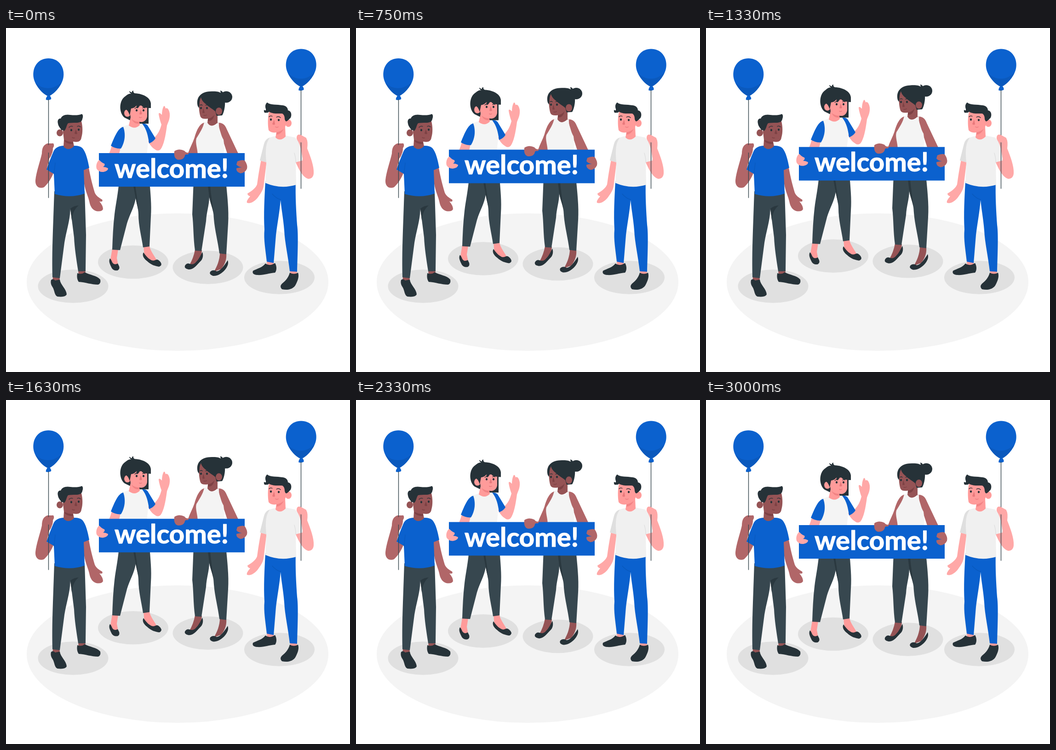
These frames come from a looping animation (748 px wide and 748 px high, 3.04 s). An HTML page with a canvas:

```html
<!DOCTYPE html>
<html lang="en">
<head>
<meta charset="utf-8">
<title>Welcome</title>
<style>
html, body { margin: 0; width: 100%; height: 100%; overflow: hidden; background: #fff; }
canvas { display: block; width: 748px; height: 748px; }
</style>
</head>
<body>
<canvas id="stage" width="748" height="748"></canvas>
<script>
const ctx = document.getElementById('stage').getContext('2d');

const BLUE = '#0b61ce', DEEP = '#0a59bd', INK = '#263238', SLATE = '#37474f', FOLD = '#2a383f';
const PINK = '#ffa8a7', ROSE = '#ff9b9a', BROWN = '#b16668', UMBER = '#955355', DUSK = '#7d4144';
const WHITE = '#f4f4f4', SHIRT = '#f0f0f0', SHADE = '#dfdfdf';

const LOOP = 3040, RATE = 24, HALF = 1500, RISE = 14.96;

function fill(color, d) {
  ctx.fillStyle = color;
  ctx.fill(new Path2D(d));
}

function line(color, width, d) {
  ctx.strokeStyle = color;
  ctx.lineWidth = width;
  ctx.lineCap = 'round';
  ctx.stroke(new Path2D(d));
}

function oval(color, x, y, rx, ry = rx) {
  ctx.fillStyle = color;
  ctx.beginPath();
  ctx.ellipse(x, y, rx, ry, 0, 0, 7);
  ctx.fill();
}

const shadow = (x, y) => oval('#e0e0e0', x, y, 76.5, 36.3);

function balloon(x, y) {
  ctx.save();
  ctx.translate(x, y);
  fill(BLUE, 'M0 0C20 0 33 15 33 35C33 56 15 74 5 80Q0 83 -5 80C-15 74 -33 56 -33 35C-33 15 -20 0 0 0Z');
  fill(DEEP, 'M-28 53C-12 70 14 68 29 51C24 64 13 75 5 80Q0 83 -5 80C-14 75 -23 64 -28 53Z');
  fill(BLUE, 'M-2 81L3 81Q7 86 5.500 89Q0 92 -5.500 90Q-6 86 -2 81Z');
  ctx.restore();
}

const string = (x, y, end) => line(SLATE, 1.4, `M${x} ${y}V${end}`);

function features(eyes, brows, nose, mouth, shade) {
  for (const [x, y] of eyes) oval(INK, x, y, 2.1, 2.5);
  line(INK, 1.3, brows);
  fill(shade, nose);
  line(shade, 1.5, mouth);
}

function manLeft() {
  shadow(146, 561.5);
  // feet
  fill(UMBER, 'M102 540L117 542L116 554L101 556ZM157 527L173 527L172 537L158 538Z');
  fill(INK, 'M98 548Q102 544 107 549L117 547C118 558 131 567 132 579Q130 586 112 584C105 582 106 570 101 563C97 557 97 552 98 548Z');
  fill(INK, 'M155 533Q164 537 171 531C181 537 198 538 205 547Q207 556 200 558C186 558 173 553 158 552Q153 545 155 533Z');
  fill(SLATE, 'M105 355L171 355L174 450L173 529L157 529C153 503 149 478 148 455L140 393C139 420 131 442 127 467L117 544L101 542C100 505 101 470 102 440Z');
  fill(FOLD, 'M158 386Q148 386 140 393L143 418Q145 396 158 386Z');
  // arms
  fill(BROWN, 'M168 307L180 304C184 326 188 341 193 358C196 365 202 369 209 373Q212 379 203 377Q211 386 211 394Q208 400 196 398C188 395 184 389 182 381C180 368 170 350 169 330Z');
  fill(BROWN, 'M104 313C100 325 91 339 83 346C72 351 63 344 64 331C66 312 74 291 78 273C78 260 82 254 90 251L100 251Q106 255 102 261Q101 276 94 284C92 295 89 302 89 309Z');
  fill(BLUE, 'M124 256C113 257 106 261 103 269C97 283 92 296 88 308L104 317L106 361Q140 371 171 360L169 309L181 304C178 288 174 270 166 261Q160 256 150 256Z');
  line(DEEP, 1.2, 'M104 317Q106 306 107 293');
  // head
  fill(UMBER, 'M122 210L126 243L125 258Q136 269 148 257L146 247C156 249 163 247 164 238C167 228 167 215 164 203L128 204Z');
  fill(DUSK, 'M127 243Q135 248 146 248L145 252Q134 253 127 246Z');
  oval(UMBER, 117, 228, 7, 7.5);
  fill(INK, 'M121 223C119 218 114 215 113 208C111 200 115 196 119 197C121 190 130 187 140 189C149 190 158 190 165 187Q169 190 166 198C165 204 160 206 152 206C145 206 140 206 135 207C131 212 131 221 126 224Q124 220 121 223Z');
  features([[142, 222], [158, 221]], 'M137 216Q141 212 145 214M155 214Q159 212 162 215',
    'M152 220L155 230Q151 232 149 229Z', 'M144 238Q146 240 149 239', DUSK);
  string(92.5, 156, 369);
  fill(BROWN, 'M90 256Q99 250 103 251Q106 255 102 261L101 271Q96 273 90 270Z');
}

function manRight() {
  shadow(594.5, 542.5);
  fill(ROSE, 'M567 506L582 508L582 518L568 518ZM618 527L633 528L632 539L618 538Z');
  fill(INK, 'M564 512Q573 519 585 511C589 518 589 527 585 532C571 533 560 538 546 537Q534 536 537 528C546 523 558 521 564 512Z');
  fill(INK, 'M617 532Q626 537 635 532C638 541 634 550 630 558C625 568 612 571 600 568Q594 562 600 556C608 550 615 541 617 532Z');
  fill(BLUE, 'M564 333L630 333C629 365 631 400 633 428C636 450 634 490 633 530L617 529C614 500 606 465 605 440C603 415 599 395 597 374C595 400 590 425 587 450L582 511L567 508C564 480 560 460 562 438C560 405 562 370 564 333Z');
  line(DEEP, 1.5, 'M579 361Q588 371 597 373');
  fill(PINK, 'M555 286L567 290C564 310 562 330 560 345C558 355 552 362 548 368C542 376 532 383 524 380Q522 376 531 366Q525 364 525 360C535 354 543 348 546 340C548 325 551 305 555 286Z');
  fill(PINK, 'M632 240Q632 230 640 232L653 240Q657 246 655 262C662 280 670 300 669 316Q668 328 657 328C645 324 637 308 629 290L645 285C644 275 639 268 637 256Z');
  fill(SHIRT, 'M586 235C575 237 565 240 562 250L552 288L566 292L564 337Q597 351 631 341L630 292L645 288C643 270 640 247 628 238L608 234Z');
  fill(SHADE, 'M574 238Q564 241 561 252L552 288L566 292C564 268 564 250 574 238Z');
  line(SHADE, 1.4, 'M630 292Q630 281 627 272');
  // head
  fill(ROSE, 'M572 181C569 195 569 210 571 222Q576 229 588 227L586 238Q596 248 608 236L607 215L612 200L605 181Z');
  fill('#f28485', 'M588 227Q598 225 604 219Q599 231 588 232Z');
  oval(ROSE, 614, 207, 7, 8);
  fill(INK, 'M566 184Q560 186 561 178Q566 181 565 176C562 168 566 163 568 162C575 168 590 166 600 168C608 168 613 173 613 179C620 180 622 188 619 195L614 200Q608 207 606 198C606 192 604 187 600 186C590 186 580 187 572 182Q569 185 566 184Z');
  features([[576, 199], [593, 200]], 'M572 193Q575 190 579 192M588 194Q593 191 597 195',
    'M583 199L579 209Q583 212 585 209Z', 'M586 215Q589 217 592 215', '#e8797c');
  string(641.5, 135, 349);
  fill(PINK, 'M632 240Q632 230 640 232L653 239L654 251Q645 252 637 246Z');
}

function womanLeft() {
  shadow(276.5, 509);
  fill(ROSE, 'M231 480L244 481L241 500L244 516L230 515L227 504ZM299 474L312 474C314 486 325 498 328 506L314 508L301 496Z');
  fill(INK, 'M226 501C223 506 225 512 229 520C232 527 238 528 243 527Q248 524 246 518L243 512Q236 516 232 511C230 508 229 503 226 501Z');
  fill(INK, 'M299 488C295 494 300 502 307 507C315 515 325 518 333 519Q341 516 336 509Q330 502 326 504Q319 508 313 503C308 500 304 495 299 488Z');
  fill(SLATE, 'M246 330L312 330C314 360 317 385 315 410L312 475L298 477C295 455 288 430 288 405C288 393 284 382 282 370C279 390 269 405 263 425L248 483L231 482C232 455 233 430 236 405C239 380 244 360 246 330Z');
  fill(FOLD, 'M277 343L281 343C284 362 287 382 288 405C288 393 284 382 282 370Z');
  // arms and top
  fill(PINK, 'M230 256L250 260Q246 276 238 288L216 288Q225 275 230 256Z');
  fill(PINK, 'M309 246L323 238C330 231 335 222 338 210C335 202 332 190 332 186Q334 183 339 189C339 182 340 175 343 170Q345 168 347 175C351 172 355 178 356 186C357 198 352 206 350 212C347 235 343 255 336 264Q330 269 324 264C318 260 314 256 309 246Z');
  fill(WHITE, 'M252 215L270 209L296 208C304 215 309 230 309 242C309 255 307 265 306 278L246 278C248 262 252 247 253 235Z');
  fill(BLUE, 'M255 215C244 217 236 236 228 256Q238 263 250 262C256 252 262 235 255 215Z');
  fill(BLUE, 'M296 208Q303 207 308 212L325 240Q321 247 311 251C309 235 306 220 296 208Z');
  // head
  fill(INK, 'M258 195C245 185 245 157 260 148C265 143 270 142 273 143Q268 141 268 137Q271 140 274 140Q273 137 277 136Q276 140 280 142C300 143 314 152 315 164L315 174L310 174L310 208L285 208Z');
  fill(ROSE, 'M267 168L271 194L267 212Q280 222 291 211L290 204C300 206 306 200 307 192L307 169Z');
  fill('#f28485', 'M273 198Q280 204 290 204L289 208Q278 209 273 198Z');
  oval(ROSE, 264, 185, 7, 8);
  fill(INK, 'M257 178C250 163 262 148 280 147C300 147 313 155 315 174L300 173Q295 171 293 165Q290 171 287 174L283 174L284 168Q280 174 272 175L269 190Q264 174 257 178Z');
  features([[284, 179], [299, 179]], 'M280 175Q283 172 286 174M297 174Q300 172 302 174',
    'M293 177L296 187Q292 189 290 187Z', 'M290 194Q292 196 295 194', '#e8797c');
}

function womanRight() {
  shadow(439, 520.5);
  fill(UMBER, 'M411 482L426 483L424 497Q418 507 410 516L398 517Q408 500 411 482ZM465 488L479 490C480 500 478 512 468 524L452 530C458 520 465 505 465 488Z');
  fill(INK, 'M427 487C430 495 427 503 424 506C415 515 408 526 397 525Q387 523 389 517Q393 510 400 513Q408 516 414 508C420 502 423 494 427 487Z');
  fill(INK, 'M482 505C485 512 481 520 476 526C470 533 460 540 450 539Q441 536 444 530Q450 524 458 529C466 528 474 518 482 505Z');
  fill(SLATE, 'M408 330L478 330C481 365 485 395 483 425L479 492L464 490C461 465 454 440 452 415C452 395 444 382 442 367C442 385 436 400 435 420L425 485L411 484C407 455 408 430 405 405Z');
  fill(FOLD, 'M439 343L444 343C445 360 450 385 452 415C452 395 444 382 442 367Z');
  // arms and top
  fill(BROWN, 'M434 205C421 207 415 221 410 238C406 250 400 260 396 272L396 280L420 280L416 245Z');
  fill(BROWN, 'M460 206C472 205 477 212 480 220L506 275L506 282L484 282L472 245Z');
  fill(WHITE, 'M431 205L440 205Q444 215 455 212L463 205C462 220 467 232 473 243C475 255 474 265 474 278L417 278C417 263 411 250 414 240C421 228 428 219 431 205Z');
  // head
  fill(UMBER, 'M421 150C418 165 420 185 423 193Q426 199 439 197L438 206Q446 219 460 206L460 190L456 165Z');
  fill(DUSK, 'M439 197Q447 196 453 189Q450 203 439 202Z');
  oval(INK, 479, 150, 13, 12.5);
  fill(INK, 'M417 170C412 150 425 139 443 138C456 137 462 138 467 141Q466 138 466 136Q471 137 473 143C479 157 476 181 470 190L458 191L455 181C449 176 440 171 434 165C428 160 425 156 424 151C420 158 421 166 420 174Z');
  oval(UMBER, 463, 181, 7, 8);
  features([[424, 174], [437, 174]], 'M422 168Q424 166 427 168M434 168Q438 166 441 170',
    'M429 174L427 184Q430 186 432 184Z', 'M430 190Q433 191 436 189', DUSK);
}

function banner() {
  ctx.fillStyle = BLUE;
  ctx.fillRect(202, 272, 317, 73);
  ctx.font = '700 58px Lato, "Open Sans", sans-serif';
  ctx.textAlign = 'center';
  ctx.fillStyle = ctx.strokeStyle = '#fff';
  ctx.lineJoin = 'round';
  ctx.lineWidth = 1.2;
  ctx.fillText('welcome!', 360, 325.5);
  ctx.strokeText('welcome!', 360, 325.5);
  // hands
  fill(PINK, 'M203 287C198 290 195 298 197 306Q202 314 212 313Q222 311 222 305Q217 302 211 302Q216 299 214 295Q208 293 203 287Z');
  fill(BROWN, 'M366 268Q376 261 388 267Q391 272 398 271L396 275Q390 274 389 277C388 284 381 288 372 286Q364 282 366 268Z');
  fill(BROWN, 'M503 290Q512 286 519 288Q526 298 524 306Q520 315 510 316Q500 313 501 305Q507 303 513 303Q505 302 501 297Z');
}

function draw(now) {
  const frame = Math.floor((now % LOOP + 4.9) * RATE / 1000);
  const t = Math.min(frame * 1000 / RATE, 2 * HALF);
  const lift = RISE * (1 - Math.abs(t - HALF) / HALF);

  ctx.fillStyle = '#fff';
  ctx.fillRect(0, 0, 748, 748);
  oval('#f4f4f4', 373, 552.5, 328, 149.5);
  balloon(92.3, 66);
  balloon(641.7, 45.5);
  manLeft();
  manRight();

  ctx.save();
  ctx.translate(0, -lift);
  womanLeft();
  womanRight();
  banner();
  ctx.restore();
}

let start;
function tick(now) {
  start ??= now;
  draw(now - start);
  requestAnimationFrame(tick);
}
draw(0);
requestAnimationFrame(tick);
</script>
</body>
</html>
```
